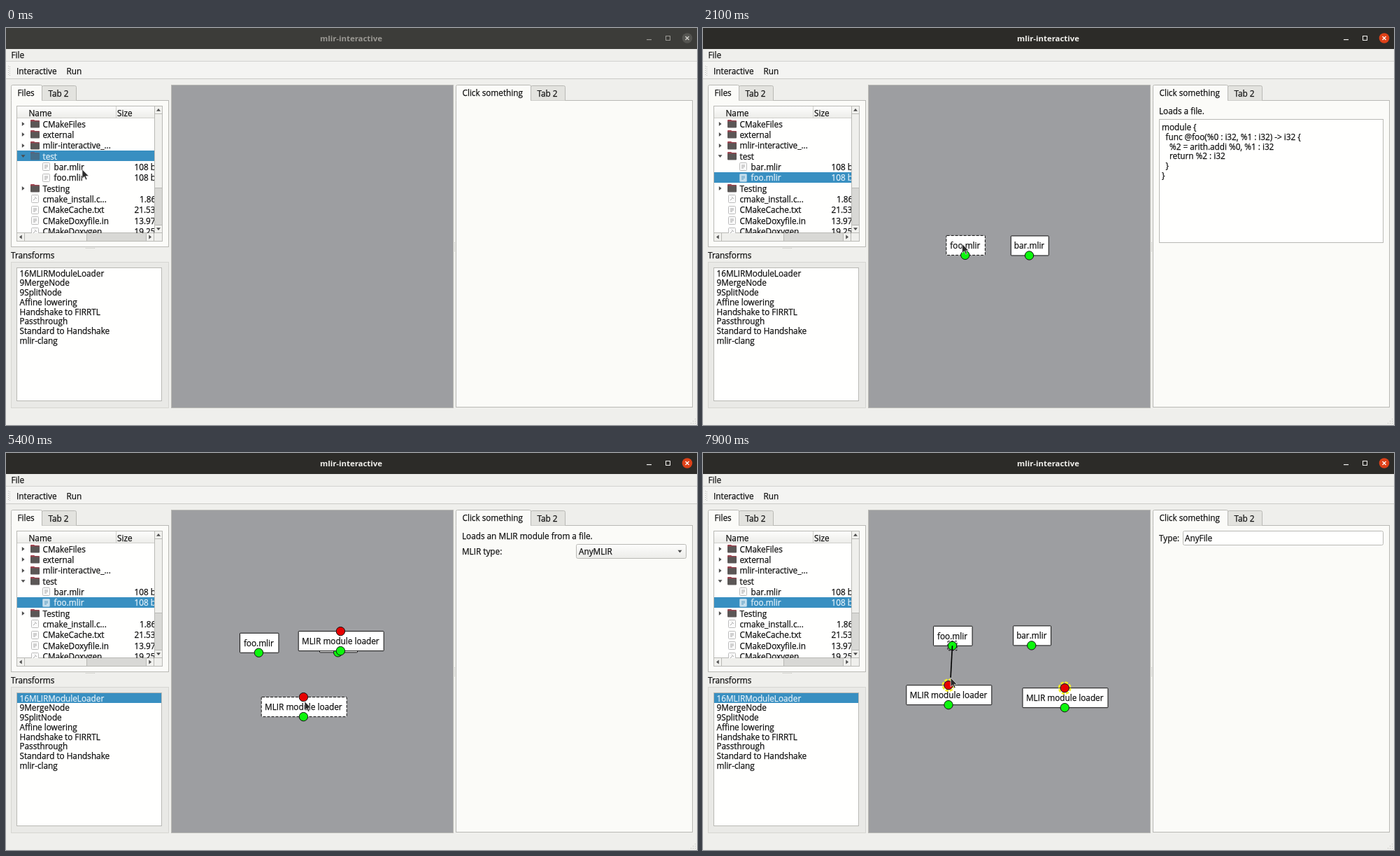
Animation, 988 px wide and 567 px high, one loop 8 s. Source, as an HTML page:

```html
<!DOCTYPE html>
<html lang="en">
<head>
<meta charset="utf-8">
<title>mlir-interactive</title>
<style>
html, body { margin: 0; width: 100%; height: 100%; overflow: hidden; background: #efefec; }
svg { display: block; }
text { font: 11.75px "Open Sans", "Noto Sans", sans-serif; white-space: pre; stroke-width: .25px; }
.title { font-size: 11.4px; font-weight: 700; stroke: none; }
</style>
</head>
<body>
<svg id="stage" width="988" height="567" viewBox="0 0 988 567">
  <defs>
    <clipPath id="treeClip"><rect x="16" y="112" width="196" height="181"/></clipPath>
    <linearGradient id="header" x2="0" y2="1"><stop stop-color="#fdfdfc"/><stop offset="1" stop-color="#ecece9"/></linearGradient>
  </defs>
  <g id="bar"></g><g id="frame"></g><g id="tree" clip-path="url(#treeClip)"></g>
  <g id="list"></g><g id="panel"></g><g id="scene"></g>
</svg>
<script>
const LOOP = 8000, STEP = 100, CONNECT = 7500;
const BLUE = '#388fc1', PALE = '#e3f0f8', INK = '#111', BORDER = '#b9b9b5', PANE = '#fbfbf8';
const $ = id => document.getElementById(id);

// Shape helpers; text is placed by its visual middle line.
const rect = (x, y, w, h, fill, more = '') =>
  `<rect x="${x}" y="${y}" width="${w}" height="${h}" fill="${fill}" ${more}/>`;
const box = (x, y, w, h, fill, stroke = BORDER, r = 0) =>
  rect(x + .5, y + .5, w - 1, h - 1, fill, `stroke="${stroke}" rx="${r}"`);
const text = (x, y, s, fill = INK, more = '') =>
  `<text x="${x}" y="${y + 4}" fill="${fill}" stroke="${fill}" ${more}>${s.replace('>', '&gt;')}</text>`;
const path = (d, fill, more = '') => `<path d="${d}" fill="${fill}" ${more}/>`;
const circle = (x, y, r, fill, more = '') => `<circle cx="${x}" cy="${y}" r="${r}" fill="${fill}" ${more}/>`;
const dots = (x, y, n, dx, dy) =>
  Array.from({ length: n }, (_, i) => rect(x + i * dx, y + i * dy, 1, 1, '#bdbdb9')).join('');
const arrow = (x, y, angle) =>
  path('M-3 -1.7H3L0 2z', '#4c4c4c', `transform="translate(${x} ${y}) rotate(${angle})"`);

// Ease-out progress of t between start and end.
function progress(t, start, end) {
  const p = Math.min(1, Math.max(0, (t - start) / (end - start)));
  return p * (2 - p);
}
const mix = (a, b, p) => a.map((v, i) => v + (b[i] - v) * p);

// Every node starts at the scene origin; drags are [start, end, x, y].
const foo = { label: 'foo.mlir', w: 55.5, from: 1200, panel: 'foo',
  drags: [[1700, 2000, -60, -4.5], [2000, 2300, -117, 2.6]] };
const bar = { label: 'bar.mlir', w: 54, from: 600, panel: 'bar', drags: [[2900, 3300, -3.7, 2.2]] };
const right = { label: 'MLIR module loader', w: 122, from: 4200, panel: 'loader', input: true,
  drags: [[6300, 6500, 52, 9], [6500, 6900, 43.7, 91]] };
const left = { label: 'MLIR module loader', w: 122, from: 4800, panel: 'loader', input: true,
  drags: [[5000, 5400, -53, 94], [5400, 5600, -126, 108], [5600, 5900, -122.5, 87]] };
const nodes = [bar, foo, right, left];

const scenePos = (n, t) =>
  n.drags.reduce((pos, [start, end, ...goal]) => mix(pos, goal, progress(t, start, end)), [0, 0]);

// The node dragged last stays selected.
const activeNode = t => nodes.filter(n => t >= n.drags[0][0])
  .sort((a, b) => b.drags[0][0] - a.drags[0][0])[0];

// The view centres the area the nodes have covered so far, one step late.
function sceneOrigin(t) {
  let x0 = 0, x1 = 0, y0 = 0, y1 = 0;
  for (const n of nodes.filter(n => n.from <= t))
    for (let s = 0; s < t; s += STEP) {
      const [x, y] = scenePos(n, s);
      x0 = Math.min(x0, x - n.w / 2);
      x1 = Math.max(x1, x + n.w / 2);
      y0 = Math.min(y0, y - (n.input ? 22 : 14));
      y1 = Math.max(y1, y + 22);
    }
  return [437.3 - (x0 + x1) / 2, 312.7 - (y0 + y1) / 2];
}

// Pointer stops: [leave, arrive, x, y, node]; with a node, x and y are the grip on it.
const stops = [
  [700, 900, 95, 212], [1300, 1400, 386.5, 276.5], [1400, 1600, -5, -2, foo], [2400, 2800, -13.6, -1, bar],
  [3400, 4000, 134, 349.5], [4700, 5000, .8, -8, left], [5900, 6200, -43.7, 7.3, right],
  [7100, CONNECT, -1, 13, foo], [CONNECT, 7900, 2.3, -24.8, left]
];

function drawNode(n, [x, y], picked, linking) {
  const px = x - .8, ink = `stroke="${INK}"`;
  let s = rect(x - n.w / 2, y - 14, n.w, 28, '#fff', `${ink} rx=".8" ${picked ? 'stroke-dasharray="4 2"' : ''}`) +
    text(px, y + .5, n.label, INK, 'text-anchor="middle"') + circle(px, y + 14, 6.2, '#0cf60c', ink);
  if (n.input) {
    if (linking) s += circle(px, y - 14, 8, 'none', 'stroke="#f5ee2a" stroke-width="2.8" stroke-dasharray="4.4 1.9"');
    s += circle(px, y - 14, 6.2, '#e60000', ink);
  }
  return s;
}

function drawScene(t) {
  const origin = sceneOrigin(t), linking = t >= CONNECT, active = activeNode(t);
  const place = (n, dx = 0, dy = 0) => {
    const [x, y] = scenePos(n, t);
    return [origin[0] + x + dx, origin[1] + y + dy];
  };
  const [x, y] = stops.reduce((pos, [leave, arrive, sx, sy, n]) =>
    mix(pos, n ? place(n, sx, sy) : [sx, sy], progress(t, leave, arrive)), [109, 202]);
  let s = nodes.filter(n => t >= n.from)
    .map(n => drawNode(n, place(n), n === active && !linking, linking)).join('');
  if (linking) {
    const [px, py] = place(foo, -.8, 14);
    s += rect(px - 6.5, py - 6.5, 13, 13, 'none', `stroke="${INK}" stroke-dasharray="3 2"`) +
      path(`M${px} ${py}L${x} ${y}`, 'none', 'stroke="#000" stroke-width="1.6"');
  }
  return s + path('M0 0V13l3-2.8 2 4.6 2-.9-2-4.4h4.2z', '#2b2b2b',
    `stroke="#e8e8e8" stroke-width=".7" transform="translate(${x} ${y})"`);
}

function drawTitle(focused) {
  const ink = focused ? '#f4f3ef' : '#9b9994';
  return rect(0, 0, 988, 30, focused ? '#2c2b28' : '#3c3c39') +
    text(493.5, 15, 'mlir-interactive', ink, 'class="title" text-anchor="middle"') +
    rect(916, 16, 7, 1.2, ink) + rect(943.5, 11.5, 6, 6, 'none', `stroke="${ink}"`) +
    circle(974, 14.5, 7.3, focused ? '#de4118' : '#555551') +
    path('M971.5 12l5 5m0-5l-5 5', 'none', `stroke="${focused ? '#fff' : '#d5d4cf'}" stroke-width="1.3"`);
}

const tab = (x, w, label, active) =>
  path(`M${x + .5} 103.5V${active ? 83.5 : 84.5}q0-2 2-2h${w - 4}q2 0 2 2V103.5`,
    active ? PANE : '#e3e3df', `stroke="${BORDER}"`) +
  (active ? rect(x + 1, 102, w - 1, 3, PANE) : '') +
  text(x + 9.5, active ? 93 : 93.5, label);

// A bar with a button at each end and a handle after the first one.
function scrollbar(x, y, w, h, handle) {
  const tall = h > w, size = 12, part = (at, len, fill) =>
    tall ? box(x, y + at, w, len, fill) : box(x + at, y, len, h, fill);
  const mid = (tall ? w : h) / 2, end = (tall ? h : w) - size / 2;
  const tip = (at, angle) => tall ? arrow(x + mid, y + at, angle) : arrow(x + at, y + mid, angle);
  return box(x, y, w, h, '#d8d8d5') + part(0, size, '#f1f1ee') + part(size - 1, handle, '#efefec') +
    part(end - size / 2, size, '#f1f1ee') + tip(size / 2, tall ? 180 : 90) + tip(end, tall ? 0 : -90);
}

function drawFrame() {
  return text(7.5, 39, 'File') + rect(0, 47, 988, 1, '#d3d3d0') +
    rect(0, 48, 988, 24, '#f4f4f2') + rect(0, 72, 988, 1, '#cbcbc7') +
    dots(3, 54, 5, 0, 3) + dots(5, 55, 5, 0, 3) +
    text(15, 61.5, 'Interactive') + text(86.5, 61.5, 'Run') +
    // file browser
    box(7, 103, 226, 210, PANE) + tab(51, 49, 'Tab 2') + tab(7, 44, 'Files', true) +
    box(15, 111, 209, 194, '#fffffe') + rect(16, 112, 196, 17, 'url(#header)') +
    rect(16, 128, 196, 1, '#d0d0cc') + rect(157, 112, 1, 17, '#cfcfcb') +
    text(32.5, 121.5, 'Name') + text(159, 121.5, 'Size') +
    scrollbar(212, 111, 12, 182, 107) + scrollbar(15, 292, 197, 13, 90) + box(211, 292, 13, 13, '#efefec') +
    dots(114, 314, 7, 2, 0) +
    // transforms
    text(7, 325, 'Transforms') + box(7, 334, 226, 209, '#e9e9e6', '#d6d6d2') + box(15, 342, 208, 191, '#fffffe') +
    // canvas and inspector
    box(236, 81, 404, 462, '#9d9ea1', BORDER) + dots(641, 306, 7, 0, 2) +
    box(643, 103, 339, 439, PANE) + tab(750, 49, 'Tab 2') + tab(643, 107, 'Click something', true) +
    [0, 1, 2].map(i => dots(985 - i * 3, 558 + i * 3, 3 - i, 0, 3)).join('');
}

// [name, size, kind]; kinds: d folder, o open folder, c child file, f file, x script
const rows = [
  ['CMakeFiles', '', 'd'], ['external', '', 'd'], ['mlir-interactive_...', '', 'd'], ['test', '', 'o'],
  ['bar.mlir', '108 bytes', 'c'], ['foo.mlir', '108 bytes', 'c'], ['Testing', '', 'd'],
  ['cmake_install.c...', '1.86 KiB', 'x'], ['CMakeCache.txt', '21.53 KiB', 'f'],
  ['CMakeDoxyfile.in', '13.97 KiB', 'f'], ['CMakeDoxygen...', '19.25 KiB', 'x']
];

function drawIcon(kind, y, on) {
  if ('do'.includes(kind))
    return arrow(24.5, y, kind === 'd' ? -90 : 0) +
      rect(35, y - 6, 6, 4, on ? '#69597a' : '#a84350', 'rx="1"') +
      rect(35, y - 5, 13, 3, on ? '#53677c' : '#944650', 'rx="1"') +
      rect(35, y - 3.5, 13, 9, on ? '#456f8c' : '#5b5756', 'rx="1"');
  const x = kind === 'c' ? 52 : 36, ink = on ? '#5f9dc2' : '#aaa';
  return box(x, y - 6, 11, 12, on ? '#c4deed' : '#fafafa', on ? '#9fc6df' : '#bdbdbd', 1) +
    (kind === 'x' ? path(`M${x + 3} ${y + 2}l4-4m-2-1l3 3`, 'none', `stroke="${ink}"`)
      : [-2, 0, 2].map(d => rect(x + 3, y + d - .5, d > 1 ? 3 : 5, 1, ink)).join(''));
}

function drawTree(selected) {
  return rows.map(([name, size, kind], i) => {
    const y = 137 + i * 15.35, on = i === selected, ink = on ? PALE : INK;
    const sizeX = size.startsWith('1.') ? 191 : 183.5;
    return (on ? rect(16, Math.round(y - 7.6), 196, 15, BLUE) : '') + drawIcon(kind, Math.round(y), on) +
      text(kind === 'c' ? 68.5 : 52.5, y + .5, name, ink) + text(sizeX, y + .5, size, ink);
  }).join('');
}

const transforms = ['16MLIRModuleLoader', '9MergeNode', '9SplitNode', 'Affine lowering',
  'Handshake to FIRRTL', 'Passthrough', 'Standard to Handshake', 'mlir-clang'];
const drawList = picked => (picked ? rect(16, 343, 206, 14, BLUE) : '') +
  transforms.map((s, i) => text(19.5, 350.5 + i * 13.75, s, picked && !i ? PALE : INK)).join('');

function drawPanel(mode) {
  if (!mode) return '';
  if (mode === 'port')
    return text(652, 122, 'Type:') + box(686, 111, 287, 21, '#fffffe', BORDER, 2) + text(689, 122, 'AnyFile');
  if (mode === 'loader')
    return text(652, 119, 'Loads an MLIR module from a file.') + text(652, 140.5, 'MLIR type:') +
      box(815, 130, 158, 21, 'url(#header)', BORDER, 2) + text(819, 140.5, 'AnyMLIR') + arrow(963.5, 140.5, 0);
  const code = ['module {', ` func @${mode}(%0 : i32, %1 : i32) -> i32 {`,
    '  %2 = arith.addi %0, %1 : i32', '  return %2 : i32', ' }', '}'];
  return text(652, 119, 'Loads a file.') + box(652, 130, 321, 177, '#fffffe') +
    code.map((s, i) => text(656 + s.search(/\S/) * 5.5, 142 + i * 13.75, s.trim())).join('');
}

// Redraw a layer only when its markup changes.
const shown = {};
function put(id, markup) {
  if (shown[id] !== markup) $(id).innerHTML = shown[id] = markup;
}

function render(t) {
  put('bar', drawTitle(t >= 300));
  put('tree', drawTree(t < 400 ? 3 : t < 1100 ? 4 : 5));
  put('list', drawList(t >= 4000));
  put('panel', drawPanel(t >= CONNECT ? 'port' : activeNode(t)?.panel));
  put('scene', drawScene(t));
}

put('frame', drawFrame());
const start = performance.now();
let last = -1;
function tick() {
  const t = Math.floor((performance.now() - start) % LOOP / STEP) * STEP;
  if (t !== last) render(last = t);
  requestAnimationFrame(tick);
}
tick();
</script>
</body>
</html>
```
